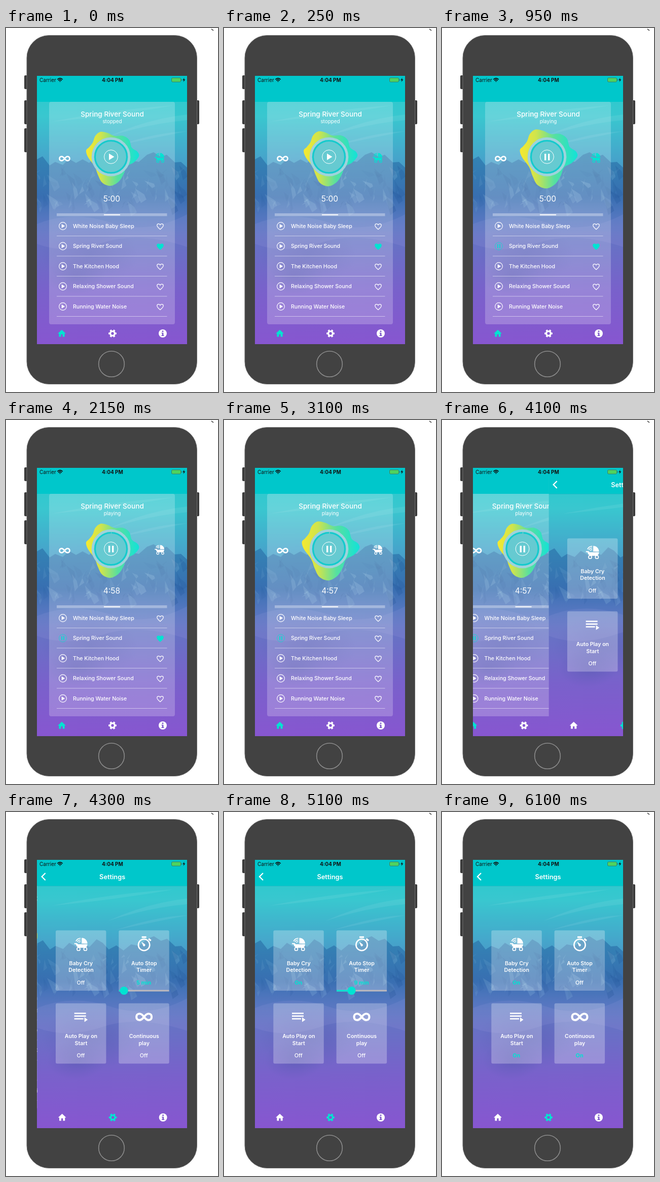
Recreate the animation shown at these times as an HTML page. Size 418 by 715 pixels, loop 6150 ms.

```html
<!DOCTYPE html>
<html lang="en">
<head>
<meta charset="utf-8">
<title>Sleep sounds app</title>
<style>
  html, body { margin: 0; width: 100%; height: 100%; overflow: hidden; background: #fff; }
  svg { display: block; }
  text { font-family: Inter, Roboto, sans-serif; fill: #fff; }
  .mid { text-anchor: middle; }
  .row { font-size: 10.6px; font-weight: 500; }
  .label { font-size: 10.6px; font-weight: 600; }
  .value { font-size: 10.8px; font-weight: 500; }
  .value.on { fill: #00e3d2; font-weight: 700; }
  .icon { color: #fff; }
  .icon.on { color: #00e3d2; }
</style>
</head>
<body>
<svg id="stage" width="418" height="715" viewBox="0 0 418 715">
  <defs>
    <clipPath id="screen"><rect x="61" y="94" width="296" height="527"/></clipPath>
    <linearGradient id="sky" x1="0" y1="0" x2="0" y2="1">
      <stop offset="0" stop-color="#21cbcd"/>
      <stop offset=".15" stop-color="#39c7cf"/>
      <stop offset=".3" stop-color="#45a6cb"/>
      <stop offset=".45" stop-color="#4d84c2"/>
      <stop offset=".6" stop-color="#6474c4"/>
      <stop offset=".8" stop-color="#7961cb"/>
      <stop offset="1" stop-color="#8756d0"/>
    </linearGradient>
    <linearGradient id="rock" gradientUnits="userSpaceOnUse" x1="0" y1="245" x2="0" y2="405">
      <stop offset="0" stop-color="#2c79ac" stop-opacity=".75"/>
      <stop offset=".55" stop-color="#2f65aa" stop-opacity=".7"/>
      <stop offset="1" stop-color="#5a6fc0" stop-opacity="0"/>
    </linearGradient>
    <linearGradient id="lime">
      <stop offset="0" stop-color="#f6e92e"/>
      <stop offset=".28" stop-color="#cfe44d"/>
      <stop offset=".6" stop-color="#56e0a0"/>
      <stop offset="1" stop-color="#12e2d8"/>
    </linearGradient>
    <radialGradient id="cloud">
      <stop offset="0" stop-color="#4c55a8" stop-opacity=".38"/>
      <stop offset="1" stop-color="#4c55a8" stop-opacity="0"/>
    </radialGradient>
    <path id="heart" d="M0 5.6C-3 3-6.2.6-6.2-2.3C-6.2-5.9-1.8-6.4 0-3.3C1.8-6.4 6.2-5.9 6.2-2.3C6.2.6 3 3 0 5.6Z"/>
    <path id="loop" d="M0 0C-3-4-5-5-7.2-5C-13.6-5-13.6 5-7.2 5C-5 5-3 4 0 0C3-4 5-5 7.2-5C13.6-5 13.6 5 7.2 5C5 5 3 4 0 0Z" fill="none" stroke="currentColor" stroke-width="3.3"/>
    <g id="pram" fill="none" stroke="currentColor" stroke-width="1.6">
      <path d="M1-12A11 11 0 0 1 12-1H1Z" fill="currentColor" stroke="none"/>
      <path d="M-13-2H-8L-6 .3H12C12 4 10 6.5 7 7H-4C-8 6-9 3-10 .2H-13Z" fill="currentColor" stroke="none"/>
      <circle cx="-5" cy="9.4" r="3"/><circle cx="8" cy="9.4" r="3"/>
      <path d="M-1-4.5A4 4 0 0 0-5-3M-1-7.8A7 7 0 0 0-7.5-4.2M-1-11A10 10 0 0 0-10-5.5"/>
    </g>
    <g id="home"><path d="M0-7.2L8 .2H5.6V6.4H1.7V1.7H-1.7V6.4H-5.6V.2H-8Z" fill="currentColor"/></g>
    <g id="gear" fill="none" stroke="currentColor">
      <circle r="4.4" stroke-width="3.4"/>
      <circle r="6.6" stroke-width="2.6" pathLength="12" stroke-dasharray="1 1" stroke-dashoffset=".5"/>
    </g>
    <g id="info">
      <circle r="8" fill="currentColor"/>
      <path d="M-2.4-1.6H1.4V3.4H2.6V5H-2.6V3.4H-1.2V0H-2.4ZM-1.4-5.4H1.4V-2.9H-1.4Z" fill="#7b57ca"/>
    </g>
    <g id="play">
      <circle r="7.4" fill="none" stroke="currentColor" stroke-width="1.1"/>
      <path d="M-2.3-4V4L4.2 0Z" fill="currentColor"/>
    </g>
    <g id="pause" stroke="currentColor" fill="none">
      <circle r="7.4" stroke-width="1" stroke-dasharray="2.2 .6"/>
      <path d="M-2-4V4M2-4V4" stroke-width="1.8"/>
    </g>
    <g id="watch" fill="none" stroke="#fff">
      <circle cy="2" r="11.2" stroke-width="2.6"/>
      <path d="M-4.5-13.2H4.5" stroke-width="3.2"/>
      <path d="M9-10L13.5-6.3" stroke-width="3.4"/>
      <path d="M-5-4L1.8 .8A2.3 2.3 0 1 1-1.6 4Z" fill="#fff" stroke="none"/>
    </g>
    <g id="list" fill="none" stroke="#fff" stroke-width="2.6">
      <path d="M-13-7H10M-13-1.6H10M-13 3.8H5"/>
      <path d="M7 .8V10L13.5 5.4Z" fill="#fff" stroke="none"/>
    </g>
    <g id="backdrop">
      <rect x="61" y="94" width="296" height="527" fill="url(#sky)"/>
      <path d="M200 214Q280 178 357 170V181Q280 188 200 214ZM90 184Q210 160 330 152Q220 172 90 184ZM215 232Q300 204 357 203Q290 216 215 232Z" fill="#fff" opacity=".07"/>
      <path d="M61 258L72 252L86 270L97 263L112 269L124 257L138 265L151 258L164 265L178 250L190 257L202 270L217 262L231 272L246 260L262 263L278 249L291 244L305 253L317 249L333 264L345 263L357 274V405H61Z" fill="url(#rock)"/>
      <g id="facets"></g>
      <ellipse cx="165" cy="445" rx="95" ry="62" fill="url(#cloud)"/>
      <ellipse cx="138" cy="487" rx="58" ry="38" fill="url(#cloud)"/>
      <path d="M61 385Q130 357 205 382T357 366V430Q260 398 190 422T61 424Z" fill="#b8b2ed" opacity=".1"/>
      <rect x="61" y="94" width="296" height="51" fill="#00c7cb"/>
    </g>
  </defs>

  <rect width="418" height="715" fill="#fff"/>
  <path d="M405 2L409 5" stroke="#222" stroke-width="1.3"/>
  <g fill="#3b3b3b">
    <rect x="36" y="93" width="8" height="27" rx="2"/>
    <rect x="36" y="142" width="8" height="47" rx="2"/>
    <rect x="36" y="197" width="8" height="47" rx="2"/>
    <rect x="373" y="142" width="8" height="47" rx="2"/>
  </g>
  <rect x="41" y="14.5" width="335.5" height="685" rx="44" fill="#424242" stroke="#6e6e6e"/>
  <circle cx="208" cy="660" r="25.3" fill="none" stroke="#8b8b8b" stroke-width="1.6"/>

  <g clip-path="url(#screen)">
    <g id="homePage"></g>
    <g id="settingsPage"></g>
    <g id="status">
      <text x="66" y="106" style="font-size:10px;fill:#111">Carrier</text>
      <g fill="none" stroke="#111" stroke-width="1.7">
        <path d="M101.3 101.2Q106.5 96.3 111.7 101.2M103.3 103.3Q106.5 100.2 109.7 103.3"/>
        <path d="M104.8 104.2H108.2L106.5 106.3Z" fill="#111" stroke="none"/>
      </g>
      <text class="mid" x="210" y="106" style="font-size:10px;font-weight:700;fill:#111">4:04 PM</text>
      <rect x="326.5" y="98" width="18" height="8" rx="2" fill="#4fd35f" stroke="#397a67" stroke-width=".9"/>
      <path d="M346.3 100.6V103.4" stroke="#397a67" stroke-width="1.3"/>
      <path d="M351.6 97.5L348.4 102.5H350.6L349.6 106.3L353.4 101H351Z" fill="#111"/>
    </g>
  </g>
</svg>
<script>
const LOOP = 6150;
const $ = id => document.getElementById(id);
const use = (ref, x, y, opt = "", scale = 1) =>
  `<use href="#${ref}" class="icon" transform="translate(${x} ${y}) scale(${scale})" ${opt}/>`;
const mid = (s, x, y, cls, opt = "") => `<text class="mid ${cls}" x="${x}" y="${y}" ${opt}>${s}</text>`;

// Closed smooth curve through points
function smooth(pts) {
  const n = pts.length, at = i => pts[(i + n) % n];
  let d = `M${pts[0]}`;
  for (let i = 0; i < n; i++) {
    const [a, b, c, e] = [at(i - 1), at(i), at(i + 1), at(i + 2)];
    const p = [0, 1].map(k => b[k] + (c[k] - a[k]) / 6);
    const q = [0, 1].map(k => c[k] - (e[k] - b[k]) / 6);
    d += `C${p} ${q} ${c}`;
  }
  return d + "Z";
}

// Faint light and dark slopes on the mountains
function facets() {
  let seed = 7, out = "";
  const rnd = () => (seed = seed * 16807 % 2147483647) / 2147483647;
  for (let i = 0; i < 75; i++) {
    const x = 58 + rnd() * 296, y = 268 + rnd() * 75, h = 10 + rnd() * 25, w = 3 + rnd() * 9;
    const lean = (rnd() - .5) * 32;
    out += `<path d="M${x} ${y}l${lean} ${h}l${w} ${-h * .25}l${-w * .4} ${-h * .35}Z"
      fill="${i % 2 ? "#a9d8ee" : "#1d4c8f"}" opacity="${.07 + rnd() * .13}"/>`;
  }
  return out;
}
$("facets").innerHTML = facets();

const blob = smooth([[176, 212], [186, 204], [200, 206], [214, 212], [231, 212], [243, 220], [248, 235],
  [259, 243], [262, 252], [252, 264], [238, 272], [232, 287], [222, 302], [206, 310], [190, 304],
  [181, 288], [175, 272], [162, 254], [158, 241], [164, 234], [171, 225]]);

const tabs = active => ["home", "gear", "info"].map((name, i) =>
  `<g class="icon ${name === active ? "on" : ""}"><use href="#${name}" x="${[110, 210, 309][i]}" y="600"/></g>`).join("");

const songs = ["White Noise Baby Sleep", "Spring River Sound", "The Kitchen Hood",
  "Relaxing Shower Sound", "Running Water Noise"];
const songRow = (name, i) => {
  const y = 389 + i * 39.5;
  return use("play", 112, y, `id="play${i}"`) + use("pause", 112, y, `id="pause${i}" style="color:#00e3d2"`) +
    `<text class="row" x="132" y="${y + 3.5}">${name}</text>` +
    use("heart", 304, y + 1, `id="heart${i}" stroke-width="1.2"`) +
    `<path d="M100 ${y + 19.5}H317.5" stroke="#fff" stroke-opacity=".5"/>`;
};

$("homePage").innerHTML = `
  <use href="#backdrop"/>
  <rect x="85" y="145" width="248" height="437" rx="4" fill="#fff" opacity=".22"/>
  ${mid("Spring River Sound", 209.5, 174, "", 'font-size="13.6" font-weight="500"')}
  ${mid("", 209.5, 187, "", 'id="state" font-size="9.9"')}
  <path id="blob" d="${blob}" fill="url(#lime)"/>
  <circle cx="207" cy="253" r="35.8" fill="#66cad1" stroke="#9ed3dc" stroke-width="5"/>
  <circle id="ring" cx="207" cy="253" r="31.5" fill="none" stroke="#14cbcd" stroke-width="3.2"
    pathLength="300" transform="rotate(-90 207 253)"/>
  <circle cx="207" cy="253" r="13.4" fill="none" stroke="#fff" stroke-width="1"/>
  <path id="bigPlay" d="M203 246.5V259.5L213.5 253Z" fill="#fff"/>
  <path id="bigPause" d="M203.7 247V260M210.7 247V260" stroke="#fff" stroke-width="3.4"/>
  ${use("loop", 115.5, 256.5, "", .83)}
  ${use("pram", 303, 254.5, 'id="cry"', .75)}
  ${mid("", 208.5, 341, "", 'id="clock" font-size="15.6"')}
  <rect x="100" y="364" width="217.5" height="5.5" fill="#fff" opacity=".33"/>
  <rect x="193" y="366" width="32" height="1.8" fill="#fff"/>
  ${songs.map(songRow).join("")}
  ${tabs("home")}`;

const tile = (x, y, icon, a, b, id) => `
  <rect x="${x}" y="${y}" width="99.5" height="118.5" rx="3" fill="#fff" opacity=".27"/>
  ${icon}
  ${mid(a, x + 50, y + 68.3, "label")}${mid(b, x + 50, y + 81.8, "label")}
  ${mid("Off", x + 49.5, y + 106.3, "value", `id="${id}"`)}`;

$("settingsPage").innerHTML = `
  <use href="#backdrop"/>
  <rect x="61" y="145" width="296" height="1" fill="#0b8fa5" opacity=".25"/>
  <path d="M77 120L70 127L77 134" fill="none" stroke="#fff" stroke-width="2.3"/>
  ${mid("Settings", 209, 131.5, "", 'font-size="12.8" font-weight="600"')}
  ${tile(97.3, 232.5, use("pram", 147.5, 259.5, "", 1.03), "Baby Cry", "Detection", "cryValue")}
  ${tile(221.6, 232.5, use("watch", 271.5, 259), "Auto Stop", "Timer", "stopValue")}
  ${tile(97.3, 375.8, use("list", 147, 402.5), "Auto Play on", "Start", "startValue")}
  ${tile(221.6, 375.8, use("loop", 271.5, 402.5, "", 1.25), "Continuous", "play", "loopValue")}
  <g id="slider">
    <path d="M222 351H321" stroke="#bdb9bd" stroke-width="3"/>
    <path id="fill" stroke="#00e3d2" stroke-width="3"/>
    <circle id="thumb" cy="351" r="8" fill="#00e3d2"/>
  </g>
  ${tabs("gear")}`;

const clamp = v => Math.max(0, Math.min(1, v));
const show = (id, on) => { $(id).style.display = on ? "" : "none"; };
const set = (id, name, v) => $(id).setAttribute(name, v);
function option(id, on, text = on ? "On" : "Off") {
  $(id).textContent = text;
  $(id).classList.toggle("on", on);
}
function heart(i, on) {
  set("heart" + i, "fill", on ? "#00e3d2" : "none");
  set("heart" + i, "stroke", on ? "#00e3d2" : "#fff");
}

function draw(t) {
  const playing = t >= 350;
  const left = 300 - [1150, 2050, 3100].filter(s => t >= s).length;

  // Player
  $("state").textContent = playing ? "playing" : "stopped";
  $("clock").textContent = `${Math.floor(left / 60)}:${String(left % 60).padStart(2, "0")}`;
  show("bigPlay", !playing);
  show("bigPause", playing);
  songs.forEach((_, i) => {
    const on = playing && i === 1;
    show("play" + i, !on);
    show("pause" + i, on);
    heart(i, i === 1 ? t < 2800 : i === 4 && t >= 3150);
  });
  $("cry").classList.toggle("on", t < 1600);
  const gap = 300 - left;
  set("ring", "stroke-dasharray", gap ? `${300 - gap} ${gap}` : "none");
  set("ring", "stroke-dashoffset", -gap);
  const scale = 1 + .045 * (1 - Math.cos(2 * Math.PI * (t - 2050) / 2100));
  set("blob", "transform", `translate(207 253) scale(${scale}) translate(-207 -253)`);

  // Page push
  const rest = (1 - clamp((t - 4040) / 300)) ** 3;
  set("settingsPage", "transform", `translate(${296 * rest} 0)`);
  set("homePage", "transform", `translate(${-98 * (1 - rest)} 0)`);
  show("settingsPage", t > 4040);

  // Settings
  const timed = t < 5350;
  const p = clamp((t - 4750) / 300), drag = p * p * (3 - 2 * p), x = 232 + 19.5 * drag;
  option("cryValue", t >= 4600);
  option("stopValue", timed, timed ? `${5 + Math.round(4 * drag)} min` : "Off");
  option("startValue", t >= 5600);
  option("loopValue", t >= 5900);
  show("slider", timed);
  set("fill", "d", `M222 351H${x}`);
  set("thumb", "cx", x);
}

const start = performance.now();
function tick() {
  draw((performance.now() - start) % LOOP);
  requestAnimationFrame(tick);
}
tick();
</script>
</body>
</html>
```
